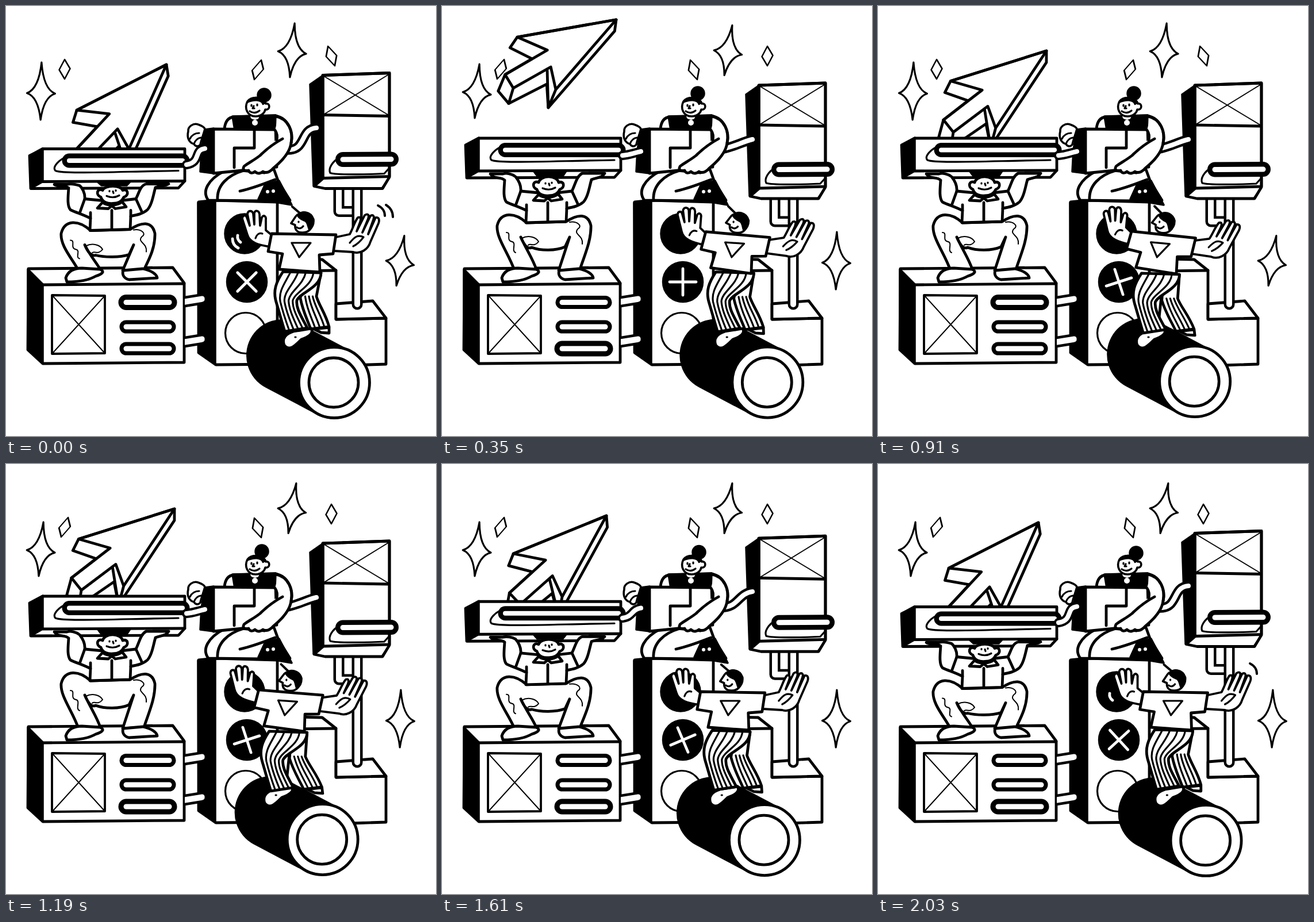
These frames come from a looping animation (748x748 px, 2.1 s). An HTML page:

```html
<!DOCTYPE html>
<html lang="en">
<head>
<meta charset="utf-8">
<title>Builders</title>
<style>
html, body { margin: 0; width: 100%; height: 100%; overflow: hidden; background: #fff; }
svg { display: block; width: 100vw; height: 100vh; }
path { fill: none; stroke: #000; stroke-width: 4.8; stroke-linecap: round; stroke-linejoin: round; }
.face { fill: #fff; }
.ink { fill: #000; stroke-width: 3.5; }
.thin { stroke-width: 2; }
.mid { stroke-width: 3.2; }
.white { stroke: #fff; stroke-width: 4.8; }
.paper { fill: #fff; stroke: none; }
</style>
</head>
<body>
<svg id="stage" viewBox="0 0 748 748"></svg>
<script>
const STEP = 70, FRAMES = 30;
const stage = document.getElementById('stage');
const bending = [];

function node(tag, parent, attrs = {}) {
  const el = document.createElementNS('http://www.w3.org/2000/svg', tag);
  for (const k in attrs) el.setAttribute(k, attrs[k]);
  return parent.appendChild(el);
}
const group = (parent = stage) => node('g', parent);
const clamp = v => Math.max(0, Math.min(1, v));
const lerp = (a, b, t) => a + (b - a) * t;
function ease(from, to, f) {
  const t = clamp((f - from) / (to - from));
  return t * t * (3 - 2 * t);
}

// Blend two paths that share the same commands.
function mix(a, b, t) {
  const to = b.match(/-?[\d.]+/g);
  let i = 0;
  return a.replace(/-?[\d.]+/g, v => lerp(+v, +to[i++], t).toFixed(1));
}

// The outline may be a function of how far the bar is pressed down.
function draw(parent, cls, d, width) {
  const bends = typeof d === 'function';
  const el = node('path', parent, { class: cls, d: bends ? d(0) : d });
  if (bends) bending.push({ el, d });
  if (width) el.style.strokeWidth = width;
  return el;
}
function tube(parent, outer, inner, d) {
  draw(parent, '', d, outer);
  draw(parent, 'white', d, inner);
}
const disc = (x, y, r) => `M${x - r} ${y}a${r} ${r} 0 1 1 ${2 * r} 0a${r} ${r} 0 1 1 ${-2 * r} 0Z`;

// --- sparkles: each cycles through three leans, one step apart from its neighbour
const starAt = [[61, 148], [498, 77], [686, 443]];
const gemAt = [[102, 110], [438, 111], [566, 87]];
const stars = starAt.map(() => draw(stage, 'mid', 'M0 0'));
const gems = gemAt.map(() => draw(stage, 'mid', 'M0 -17L9.5 -1L0 17L-9.5 1Z', 2.5));

function twinkle(beat) {
  stars.forEach((el, i) => {
    const lean = (i - beat + 3) % 3, h = 50 - 3 * lean;
    el.setAttribute('d', `M0 ${-h}Q4 -4 24.5 4Q5 10 0 ${h}Q-5 10 -24.5 4Q-4 -4 0 ${-h}Z`);
    move(el, ...starAt[i], `rotate(${1 + 4 * lean})`);
  });
  gems.forEach((el, i) => {
    const lean = (i - beat + 4) % 3 - 1;
    move(el, ...gemAt[i], `skewX(${-19 * lean})`);
  });
}

// --- stand on the right
draw(stage, 'face', 'M500 440L550 441L574 460V545L661 543V623L600 625H480Z');
draw(stage, 'face', 'M574 545V518L638 513L661 543Z');
draw(stage, '', 'M500 461L574 460');

const hook = group();
tube(hook, 19, 10, 'M579 325V375H608');
tube(stage, 19, 10, 'M611 300V519');

const crate = group();
draw(crate, 'face', 'M536 331L555 335L655 335L667 315V134L551 138V318Z');
draw(crate, 'ink', 'M529 154L552 138V316L535 330Z');
draw(crate, '', 'M551 138L667 134V314L552 317M552 207L667 209');
draw(crate, 'thin', 'M552 139L665 207M665 137L553 206');
draw(crate, 'mid', 'M580 281C568 288 560 300 564 308C575 312 640 310 658 309L667 299M655 333L667 316');
tube(crate, 26, 9, 'M586 284.5L670 284');

// --- column
draw(stage, 'face', 'M335 341L365 338L472 341V623L365 624L335 603Z');
draw(stage, 'ink', 'M334 342L364 340V622L335 603Z');
draw(stage, 'ink', disc(415, 396, 34));
draw(stage, 'ink', disc(419, 480, 34.5));
draw(stage, 'mid', disc(417, 569, 35.5));
const cross = group();
draw(cross, 'white', 'M-23 0H23M0 -23V23');
const nearMarks = [
  draw(stage, 'white', 'M403 399C402 404 404 408 408 411'),
  draw(stage, 'white', 'M394 405C394 412 398 418 404 421')
];

// --- left box
draw(stage, 'face', 'M39 457L290 455L310 482V620L64 622L38 598Z');
draw(stage, 'ink', 'M38 458L64 484V621L38 598Z');
draw(stage, '', 'M64 485L310 483');
draw(stage, '', 'M80 503L172 504V604L80 605Z', 3.8);
draw(stage, 'thin', 'M80 503L172 604M172 504L80 605');
const slots = [515.5, 558, 596].map(y => {
  const rim = draw(stage, '', `M209 ${y}H284`);
  draw(stage, 'white', `M209 ${y}H284`, 9);
  return rim;
});
for (const y of [507, 577]) {
  draw(stage, 'face', `M311 ${y}L342 ${y - 5}C350 ${y - 4} 350 ${y + 9} 342 ${y + 10}L311 ${y + 15}`);
}

// --- arrow, tip at 0 0
const arrow = group();
draw(arrow, 'face', 'M0 0L-171 36L-183 55L-144 73L-190 102L-201 131L-182 152L-117 116L-113 157L-2 20Z');
draw(arrow, '', 'M0 0L-171 36L-118 57L-190 102L-175 125L-111 86L-101 125ZM-175 125L-182 152M-101 125L-113 157L-117 92');

// --- bar
const bar = group();
draw(bar, 'face', 'M64 230L311 230V286L300 298L43 299L41 242Z');
draw(bar, 'ink', 'M41 242L64 229V287L43 299Z');
draw(bar, '', 'M64 287L311 286');
draw(bar, 'mid', 'M108 243C92 248 80 262 86 268C100 274 180 270 300 268');
tube(bar, 25, 8, 'M110 250.5H307');

// --- squatting builder: hands follow the bar, the body sinks, the feet stay
const drop = y => 13.5 * clamp((460 - y) / 40) + 5 * clamp((300 - y) / 8);
const sag = d => press => d.replace(/([\d.]+) ([\d.]+)/g, (_, x, y) => `${x} ${(+y + drop(+y) * press).toFixed(1)}`);
const squat = (cls, d) => draw(stage, cls, sag(d));

squat('face', 'M147 377C126 358 102 358 96 382C94 404 116 430 126 460L164 458C158 440 148 426 137 402C142 414 148 424 156 420C172 426 198 426 214 419L222 402L203 460L240 458C247 436 260 408 259 382C254 360 236 362 216 375Z');
squat('thin', 'M112 394C122 394 110 408 122 410C130 412 120 426 128 429M139 404C150 398 164 402 168 410C160 420 154 412 150 416M222 376C234 374 246 382 236 388C228 398 246 398 244 414');
draw(stage, 'face', 'M104 473C108 461 118 456 132 456L164 458C172 462 168 466 156 470C142 478 122 480 106 480Z');
draw(stage, 'face', 'M204 460L238 457C252 460 262 466 263 473L214 476C206 474 201 468 204 460Z');
squat('face', 'M84 292C90 302 102 296 109 303C108 318 106 334 112 341C122 346 136 350 147 356L146 377L216 375L217 352C228 350 238 348 246 341C254 332 256 316 260 302C268 298 278 300 283 291L244 291C234 296 232 310 226 322L200 325L168 325L137 322C138 312 132 302 128 297C122 292 112 290 106 292Z');
squat('', 'M137 322L128 347M226 322L237 346M147 346L147 356M217 342L217 353M184 342L184 375');
squat('ink', 'M160 288L216 287L210 296L166 296Z');
squat('face', 'M168 307C159 302 155 315 165 319C168 328 177 331 186 330C196 330 202 326 205 319C215 316 212 303 203 307C200 294 172 293 168 307Z');
squat('mid', 'M175 317C182 320 190 320 197 316M180 308L180 309M191 307L191 308M186 309L187 312');
squat('face', 'M168 328L159 338L178 339L184 334L190 339L209 336L202 327C194 334 176 335 168 328Z');

// --- kneeling builder
draw(stage, 'face', 'M352 338C340 322 352 302 378 288L466 284L474 306L494 338L440 339Z');
draw(stage, '', 'M368 338C366 312 386 294 414 286M407 322C430 317 450 309 468 302');
draw(stage, 'ink', 'M439 336L450 312L475 304L497 346L468 341Z');
draw(stage, 'paper', disc(455, 323, 3) + disc(465, 322, 3));
tube(stage, 17, 8, p => mix('M486 249C506 246 520 237 540 232', 'M486 250C524 254 510 214 540 212', p));
draw(stage, 'face', 'M380 214C381 202 386 194 396 193L470 191C492 196 500 220 496 238C490 262 462 280 450 290L400 285Z');
draw(stage, 'ink', 'M394 192L469 190L468 216L398 216Z');
draw(stage, 'paper', 'M424 188H442L439 196C434 199 430 198 426 195Z' + disc(433, 203, 5));
draw(stage, 'face', 'M361 214L469 215L471 280L361 291Z');
draw(stage, 'ink', 'M346 215L361 213V291L338 288L340 250Z');
draw(stage, '', 'M397 281V247H432V217');
draw(stage, 'paper', 'M468 216L474 230L440 256L413 279L450 290L492 248L494 210L472 200Z');
draw(stage, 'face', 'M481 231C468 238 452 250 442 260C432 268 420 274 414 279C410 287 418 287 422 286C424 292 430 291 433 288C438 293 444 291 447 288C454 292 460 288 465 282C480 270 494 254 496 238');
draw(stage, '', 'M469 192C492 196 500 220 496 238M468 216C472 222 472 226 471 234');
draw(stage, 'face', 'M317 218C316 210 326 203 334 206C340 208 345 211 346 214C344 222 340 232 338 241C334 246 329 244 327 240C319 238 314 230 317 218Z', 3.6);
draw(stage, 'mid', 'M320 231C323 225 329 221 336 221M327 240C329 234 333 230 339 229');
tube(stage, 16, 8, p => mix('M314 260C326 259 332 256 346 253', 'M314 276C340 272 326 250 346 248', p));
draw(stage, 'face', 'M420 166C414 178 420 192 434 192C444 192 450 186 451 180C460 182 460 168 452 170C448 158 428 156 420 166Z', 3.6);
draw(stage, 'ink', 'M419 168C424 158 444 154 452 168L447 171C444 163 432 162 419 168Z', 2.5);
draw(stage, 'ink', p => disc(445 + 4 * p, 152 + 3 * p, 11));
draw(stage, 'mid', 'M424 183C430 187 436 186 441 182M427 172V174M437 171V173M431 174L429 178H432');

// --- roller
const roller = group();
draw(roller, '', 'M481 608L568 654', 126);
draw(roller, 'face', disc(571, 655, 61.5));
draw(roller, 'face', disc(570, 655, 43));

// --- balancing builder
const backLeg = group(), shoe = group(), frontLeg = group(), torso = group();

function stripes(parent, left, right, count) {
  for (let i = 1; i <= count; i++) draw(parent, 'mid', mix(left, right, i / (count + 1)));
}
draw(backLeg, 'face', 'M536 562L562 559L562 569L548 568Z');
draw(backLeg, 'face', 'M512 508C516 530 524 545 530 562L562 558C556 535 544 520 540 505L548 464L520 470Z');
stripes(backLeg, 'M514 505C516 530 524 545 530 562', 'M540 505C544 520 556 535 562 558', 3);

draw(shoe, 'face', 'M484 590C479 577 488 570 500 566L531 561C536 570 526 576 514 580C504 590 493 602 484 590Z');
draw(shoe, 'mid', 'M503 576H504');

draw(frontLeg, 'face', 'M482 462C470 480 464 495 470 515C476 535 480 550 485 566L524 560C514 540 504 526 506 512C512 498 548 490 548 464Z');
stripes(frontLeg, 'M482 462C470 480 464 495 470 515C476 535 480 550 485 566', 'M548 464C548 490 512 498 506 512C504 526 514 540 524 560', 4);

draw(torso, 'face', 'M460 419C440 416 424 412 420 398L411 370C411 364 417 362 419 368L424 382L420 362C421 355 428 355 430 361L432 380V360C434 354 440 356 441 362L442 382L445 368C448 362 453 366 452 372V390L464 400Z', 3.8);
draw(torso, 'mid', 'M434 404C436 398 440 394 446 396');
draw(torso, 'face', 'M570 403L598 397C604 386 606 376 612 368C617 366 618 370 616 376L610 392L624 364C630 360 632 364 630 370L620 394L634 365C640 362 641 367 639 372L630 397L643 368C649 367 650 372 648 378L634 410C630 424 616 432 604 428L570 426Z', 3.8);
draw(torso, 'mid', 'M598 412C606 402 612 397 622 402C616 410 612 414 604 418');
draw(torso, 'face', 'M462 396L574 398L569 431L545 433L546 463L475 458L481 431L456 427Z');
draw(torso, 'mid', 'M497 412L530 412L510 437Z');
draw(torso, 'face', 'M504 366L496 378L503 381C502 390 508 395 517 394C527 394 534 386 533 374C526 360 510 358 504 366Z', 3.6);
draw(torso, 'ink', 'M508 365C512 355 530 357 535 371C536 380 533 385 528 389C525 384 526 378 521 374C516 372 510 369 508 365Z');
draw(torso, '', 'M498 349L512 361', 4);
draw(torso, 'mid', 'M506 385C510 388 514 387 517 383M509 375V376');

const farMarks = [
  draw(stage, '', 'M647 347C655 351 659 357 659 365', 4),
  draw(stage, '', 'M661 346C669 351 673 359 673 367', 4),
  draw(stage, '', 'M683 347L691 339', 4)
];

// --- motion, measured in steps of the loop
function move(el, x, y, extra = '') {
  el.setAttribute('transform', `translate(${x} ${y}) ${extra}`);
}
const show = (el, on) => { el.style.display = on ? '' : 'none'; };

function pose(f) {
  const press = 1 - ease(0, 5, f) + ease(19, 27, f);
  const lean = ease(0, 7, f) - ease(14, 23, f);
  const roll = (1 - Math.cos(2 * Math.PI * (f - .3) / FRAMES)) / 2;
  const hop = Math.max(0, 1 - Math.abs((f - 7.8) / 5.1) ** 3);
  const spin = 45 + 9 * Math.min(f, 13) - 27 * ease(20, 31, f);

  for (const { el, d } of bending) el.setAttribute('d', d(press));
  move(bar, 0, 18.5 * press);
  move(crate, 0, -17.5 * press);
  move(hook, 0, -17.5 * press);
  move(arrow, lerp(293, 279, press) + 12 * hop, lerp(78, 102, press) - 65 * hop,
    `rotate(${lerp(-5.6, -15, press) + 9 * hop})`);
  move(cross, 419, 480, `rotate(${spin})`);

  move(roller, -21 * roll, -2 * roll);
  move(shoe, -35 * roll, 0);
  move(frontLeg, -25 * roll, 3 * roll);
  backLeg.setAttribute('transform', `matrix(1 0 ${.13 * roll} 1 ${-85.5 * roll} ${4 * roll})`);
  move(torso, -25.5 * roll, 0, `rotate(${5 * lean} 510 430)`);

  const beat = Math.floor(f / 2) % 3;
  twinkle(beat);
  slots.forEach((rim, k) => { rim.style.strokeWidth = k === beat ? 27 : 23; });

  const inner = f >= 29 || f < 2, outer = f < 3, flick = f === 25;
  show(farMarks[0], inner);
  show(farMarks[1], outer);
  show(farMarks[2], flick);
  show(nearMarks[0], inner);
  show(nearMarks[1], outer || flick);
}

const start = performance.now();
let last = -1;
function tick() {
  const f = Math.floor((performance.now() - start) / STEP) % FRAMES;
  if (f !== last) pose(last = f);
  requestAnimationFrame(tick);
}
tick();
</script>
</body>
</html>
```
